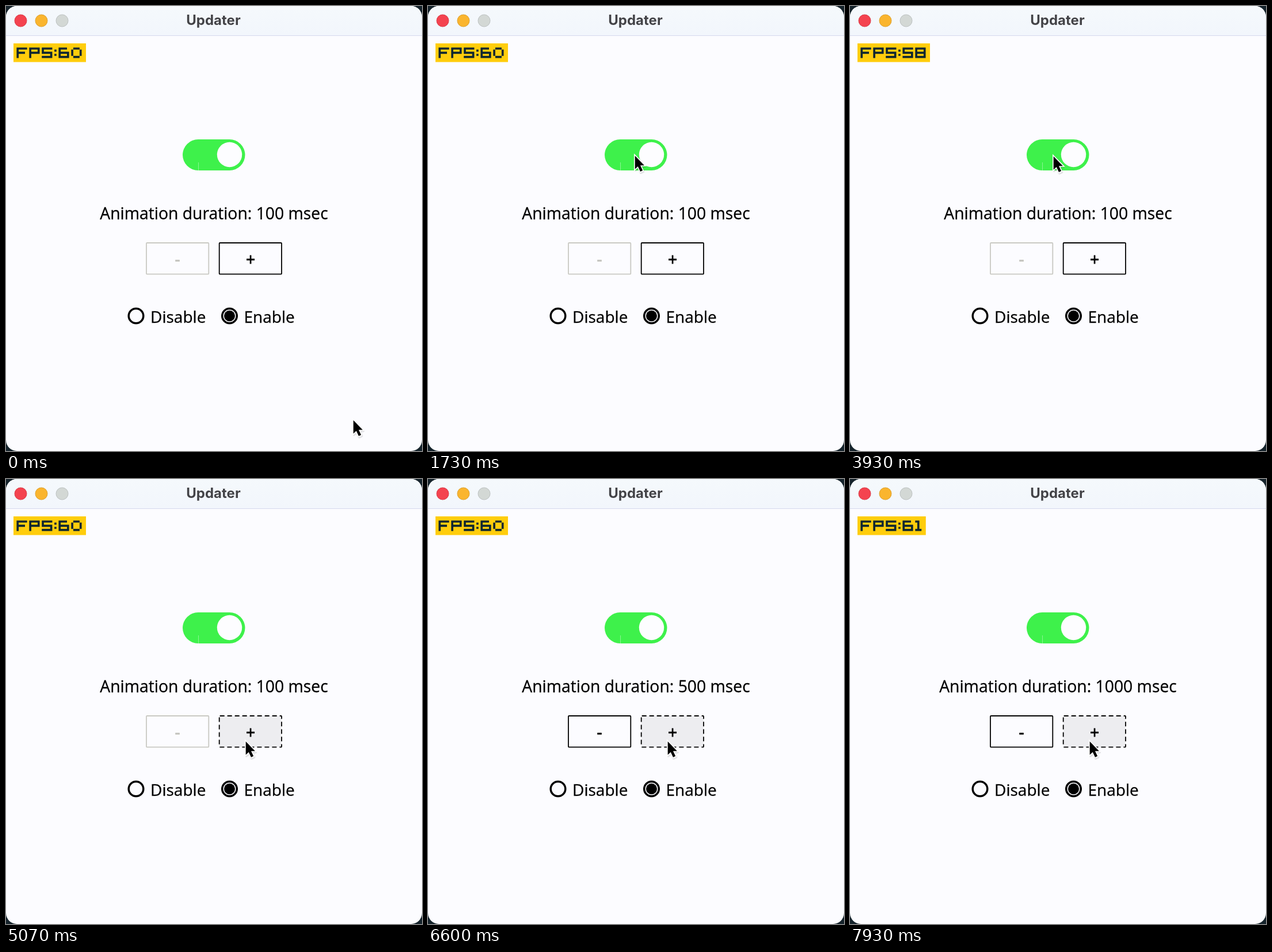
Recreate the animation shown at these times as an HTML page. Size 723 by 774 pixels, loop 8000 ms.

```html
<!DOCTYPE html>
<html lang="en">
<head>
<meta charset="utf-8">
<title>Updater</title>
<style>
  html, body { margin: 0; width: 100%; height: 100%; overflow: hidden; background: #15232b; }
  svg { display: block; width: 723px; height: 774px; }
  text { font: 28.3px "Open Sans", "Noto Sans", sans-serif; text-anchor: middle; stroke: #000; stroke-width: .3; }
  .title { font: 700 24px Inter, sans-serif; fill: #434347; stroke: none; }
  .label { font-size: 28px; text-anchor: start; }
  .sign { stroke-width: .8; }
  .box { fill: none; stroke: #000; stroke-width: 1.8; }
  .hover .box { fill: #ededf0; stroke-dasharray: 8 5; }
  .disabled .box { stroke: #c9c9c3; }
  .disabled text { fill: #c2c2bc; stroke: #c2c2bc; }
  .ring { fill: none; stroke: #000; stroke-width: 3.5; }
</style>
</head>
<body>
<svg viewBox="0 0 723 774">
  <defs>
    <linearGradient id="bar" x2="0" y2="1">
      <stop stop-color="#f5f9fc"/><stop offset="1" stop-color="#f2f6fc"/>
    </linearGradient>
    <clipPath id="window"><rect width="723" height="774" rx="19"/></clipPath>
    <path id="arrow" d="M0 0V25L5.5 20L10 29.5L14.5 27.5L10 18H17.5Z"/>
  </defs>

  <g clip-path="url(#window)">
    <rect width="723" height="774" fill="#fcfcff"/>
    <rect width="723" height="51" fill="url(#bar)"/>
    <path d="M0 51.5H723" stroke="#d5d8ee"/>
  </g>
  <circle cx="25.5" cy="25.5" r="10.5" fill="#f4434f" stroke="#d93a48"/>
  <circle cx="61.5" cy="25.5" r="10.5" fill="#fab52e" stroke="#dd9f2d"/>
  <circle cx="97.5" cy="25.5" r="10.5" fill="#d3d8d5" stroke="#bcc1c0"/>
  <text class="title" x="360.5" y="33">Updater</text>

  <g id="fps">
    <rect id="badge" x="13" y="65" height="32.5" fill="#ffcd0c"/>
    <path id="pixels" fill="#0c2630" transform="translate(18.4 72.2) scale(3.65)"/>
  </g>

  <rect id="track" x="307" y="232" width="108.5" height="54" rx="27"/>
  <path d="M334.5 272V286" stroke="#fff" stroke-opacity=".4"/>
  <path id="seam" d="M389.5 232V246" stroke="#fff" stroke-opacity=".4"/>
  <circle id="knob" cy="258.5" r="21.7" fill="#fdfdff"/>

  <text id="duration" x="361.5" y="371"></text>

  <g id="minus"><rect class="box" x="244" y="412" width="108.3" height="54.3" rx="1"/><text class="sign" x="298" y="451">-</text></g>
  <g id="plus"><rect class="box" x="370.7" y="412" width="108.3" height="54.3" rx="1"/><text class="sign" x="425" y="451">+</text></g>

  <circle class="ring" cx="226" cy="539" r="12.8"/>
  <text class="label" x="251" y="550.5">Disable</text>
  <circle class="ring" cx="388.5" cy="539" r="12.8"/>
  <circle cx="388.5" cy="539" r="9.5"/>
  <text class="label" x="413.5" y="550.5">Enable</text>

  <g id="cursor">
    <g transform="translate(.7 1.5) scale(.93)">
      <use href="#arrow" x="1" y="2" fill="none" stroke="#000" stroke-opacity=".1" stroke-width="5" stroke-linejoin="round"/>
      <use href="#arrow" stroke="#fff" stroke-width="3.5" paint-order="stroke"/>
    </g>
  </g>
</svg>
<script>
const LOOP = 8000;
const SWITCH_OFF = 2553, SWITCH_ON = 3700, SLIDE = 100;
const LAST_CLICK = 7870, CLICK_GAP = 268;
const KNOB_ON = 388.5, KNOB_OFF = 334.5;

// time, x, y of the pointer tip
const pointerPath = [
  [70, 603, 719], [380, 601, 732], [1500, 359, 259], [1800, 359, 259], [2300, 353, 260],
  [4000, 353, 260], [4340, 420, 316], [4950, 416, 455]
];

// rows of each 5-cell-high glyph
const glyphs = {
  F: '##### #.... ####. #.... #....',
  P: '##### #...# ##### #.... #....',
  S: '##### #.... ##### ....# #####',
  ':': '. # . # .',
  0: '.###. #...# #...# #...# .###.',
  1: '##. .#. .#. .#. ###',
  5: '##### #.... ##### ....# #####',
  6: '####. #.... ##### #...# #####',
  8: '##### #...# ##### #...# #####'
};

const $ = id => document.getElementById(id);
const clamp = v => Math.min(1, Math.max(0, v));
const smooth = v => v * v * (3 - 2 * v);

function pointerAt(t) {
  const next = pointerPath.findIndex(p => p[0] > t);
  if (next === 0) return pointerPath[0].slice(1);
  if (next < 0) return pointerPath.at(-1).slice(1);
  const [t0, x0, y0] = pointerPath[next - 1], [t1, x1, y1] = pointerPath[next];
  const k = smooth((t - t0) / (t1 - t0));
  return [x0 + (x1 - x0) * k, y0 + (y1 - y0) * k];
}

function drawFps(value) {
  let left = 0, d = '';
  for (const char of 'FPS:' + value) {
    const rows = glyphs[char].split(' ');
    rows.forEach((row, y) => [...row].forEach((cell, x) => {
      if (cell === '#') d += `M${left + x} ${y}h1v1h-1z`;
    }));
    left += rows[0].length + 1;
  }
  $('pixels').setAttribute('d', d);
  $('badge').setAttribute('width', (left + 3) * 3.6);
}

function render(t) {
  const on = t < SWITCH_OFF || t >= SWITCH_ON;
  const position = 1 - clamp((t - SWITCH_OFF) / SLIDE) + clamp((t - SWITCH_ON) / SLIDE);
  $('knob').setAttribute('cx', KNOB_OFF + (KNOB_ON - KNOB_OFF) * position);
  $('track').setAttribute('fill', on ? '#3ef14b' : '#b1b1a9');
  $('seam').style.display = on ? 'none' : '';
  $('fps').style.display = on ? '' : 'none';
  drawFps(t >= LAST_CLICK ? 61 : t >= SWITCH_ON && t < 4600 ? 58 : 60);

  const steps = Math.max(1, 10 + Math.floor((t - LAST_CLICK) / CLICK_GAP));
  $('duration').textContent = `Animation duration: ${Math.min(10, steps) * 100} msec`;
  $('minus').classList.toggle('disabled', steps === 1);

  const [x, y] = pointerAt(t);
  $('plus').classList.toggle('hover', x > 370 && x < 480 && y > 411 && y < 467);
  $('cursor').setAttribute('transform', `translate(${x} ${y})`);
}

const start = performance.now();
function tick() {
  render((performance.now() - start) % LOOP);
  requestAnimationFrame(tick);
}
tick();
</script>
</body>
</html>
```
